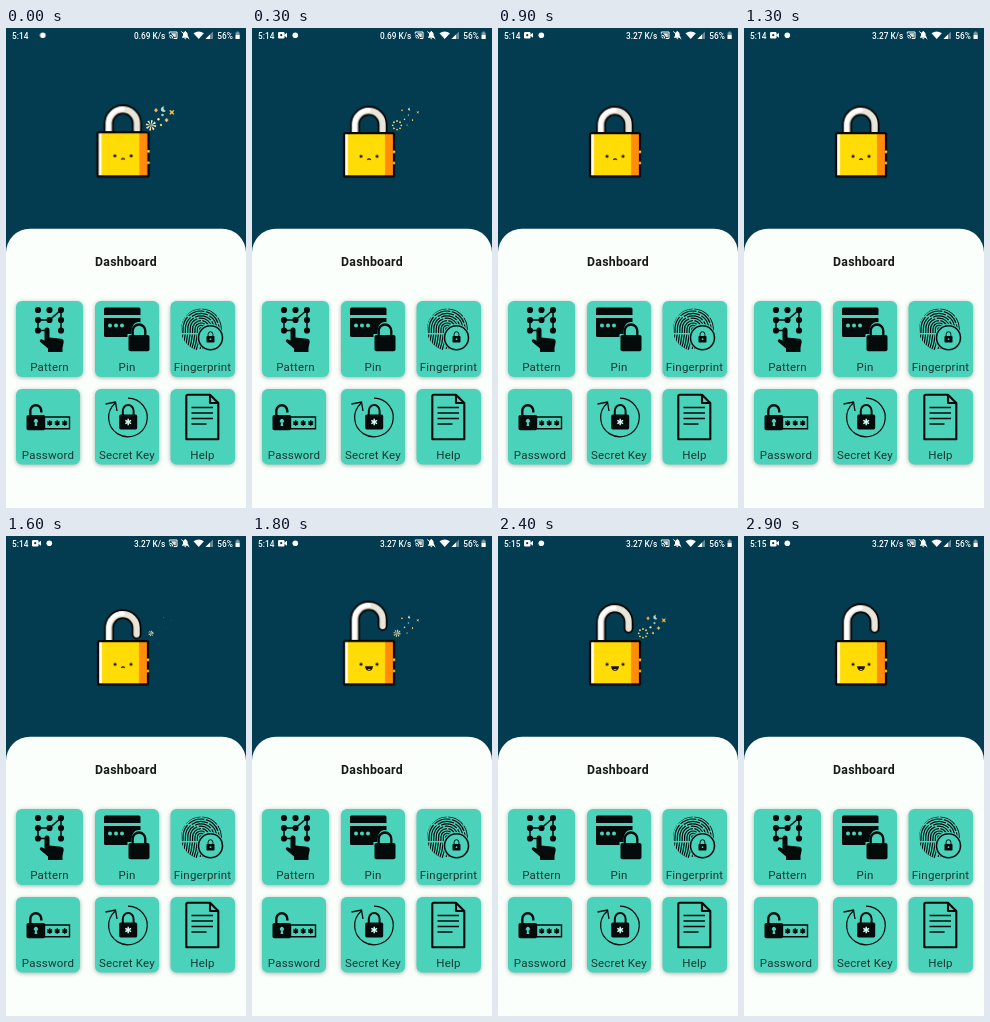
An HTML page that plays this animation: 240 by 480 pixels, repeating every 3000 ms.

```html
<!DOCTYPE html>
<html lang="en">
<head>
<meta charset="utf-8">
<title>Dashboard</title>
<style>
html, body { margin: 0; width: 100%; height: 100%; overflow: hidden; background: #033b50; }
svg { display: block; width: 100%; height: 100%; }
text { font-family: Roboto, "Open Sans", sans-serif; }
.status { fill: #fff; font-size: 8.3px; font-weight: 500; }
.title { font-size: 12.3px; font-weight: 700; letter-spacing: .25px; fill: #151918; text-anchor: middle; }
.labels { font-size: 11.5px; letter-spacing: .2px; fill: #173530; text-anchor: middle; }
.cards { fill: #4bd2ba; filter: drop-shadow(0 1.5px 2px rgba(0, 30, 25, .35)); }
.line { fill: none; stroke: #050a0a; }
.teal { fill: #4bd2ba; }

.clock-a, .clock-b, .rate-a, .rate-b, .cam, .badge, .calm, .happy { animation: 3s step-end infinite; }
.clock-a { animation-name: clock-a; }
.clock-b { animation-name: clock-b; }
.rate-a { animation-name: rate-a; }
.rate-b { animation-name: rate-b; }
.cam { animation-name: cam; }
.badge { animation-name: badge; }
.calm { animation-name: calm; }
.happy { animation-name: happy; }
@keyframes clock-a { 0% { opacity: 1 } 73.3%, 100% { opacity: 0 } }
@keyframes clock-b { 0% { opacity: 0 } 73.3%, 100% { opacity: 1 } }
@keyframes rate-a { 0% { opacity: 1 } 23.3%, 100% { opacity: 0 } }
@keyframes rate-b { 0% { opacity: 0 } 23.3%, 100% { opacity: 1 } }
@keyframes cam { 0% { opacity: 0 } 3.3%, 100% { opacity: 1 } }
@keyframes badge { 0% { transform: translateX(-6.5px) } 3.3%, 100% { transform: none } }
@keyframes calm { 0% { opacity: 1 } 60%, 100% { opacity: 0 } }
@keyframes happy { 0% { opacity: 0 } 60%, 100% { opacity: 1 } }

.shackle { animation: lift 3s linear infinite; }
@keyframes lift {
  0%, 50% { transform: none }
  53.3% { transform: translateY(-4.5px) }
  58.3% { transform: translateY(-14px) }
  66.7% { transform: translateY(-8px) }
  73%, 100% { transform: translateY(-10.5px) }
}
.lock { transform-origin: 117px 149px; animation: puff 3s linear infinite; }
@keyframes puff {
  0%, 70% { transform: scale(1.02) }
  8%, 58%, 78%, 100% { transform: none }
}
.bits > *, .bloom, .ring {
  transform-box: fill-box;
  transform-origin: center;
  animation: 3s linear infinite;
}
.bits > * { animation-name: bit; }
.bloom { animation-name: bloom; }
.ring { animation-name: ring; }
@keyframes bit {
  0%, 71.7% { transform: scale(1) }
  10% { transform: scale(.5) }
  17%, 50% { transform: scale(0) }
  53.3% { transform: scale(.12) }
  66.7% { transform: scale(.9) }
  80% { transform: scale(.8) }
  90%, 100% { transform: scale(0) }
}
@keyframes bloom {
  0%, 5% { transform: none; opacity: 1 }
  5.1%, 49.9% { transform: scale(0); opacity: 0 }
  50% { transform: scale(0); opacity: 1 }
  53.3% { transform: scale(.5); opacity: 1 }
  66.7% { transform: scale(.85); opacity: 1 }
  71.7%, 75% { transform: none; opacity: 1 }
  75.1%, 100% { transform: scale(0); opacity: 0 }
}
@keyframes ring {
  0%, 5% { opacity: 0 }
  5.1%, 10% { opacity: 1 }
  18%, 75% { opacity: 0 }
  75.1%, 81% { opacity: 1 }
  89%, 100% { opacity: 0 }
}
</style>
</head>
<body>
<svg viewBox="0 0 240 480" preserveAspectRatio="none">
  <defs>
    <g id="padlock">
      <rect y="10" width="20" height="15" rx="1.8"/>
      <path d="M4 11V6.5a6 6 0 0 1 12 0V11" fill="none" stroke="#050a0a" stroke-width="2.2"/>
    </g>
    <path id="star" d="M0-2.7V2.7M-2.4-1.4 2.4 1.4M-2.4 1.4 2.4-1.4"/>
    <path id="hoop" d="M103 124V96.5a13.8 13.8 0 0 1 27.6 0V103"/>
    <clipPath id="pad"><ellipse cx="195.5" cy="301.5" rx="20.5" ry="21"/></clipPath>
  </defs>

  <rect width="240" height="480" fill="#033b50"/>

  <g class="status">
    <text class="clock-a" x="6" y="10.5">5:14</text>
    <text class="clock-b" x="6" y="10.5">5:15</text>
    <g class="cam">
      <rect x="26" y="4" width="6.5" height="6.5" rx="1.2"/>
      <path d="M32 7 35 4.7V9.8L32 7.6z"/>
      <circle cx="29.2" cy="7.2" r="1.1" fill="#033b50"/>
    </g>
    <circle class="badge" cx="43.3" cy="7.3" r="2.8"/>
    <text class="rate-a" x="128" y="10.5">0.69 K/s</text>
    <text class="rate-b" x="128" y="10.5">3.27 K/s</text>
    <path d="M163.3 5.7V4h7.7v6.5h-3.2M163.3 7a3.5 3.5 0 0 1 3.5 3.5M163.3 8.8a1.7 1.7 0 0 1 1.7 1.7" fill="none" stroke="#fff"/>
    <path d="M165 5.3h4.8v3.9h-1.6z" opacity=".85"/>
    <path d="M176 9.8V9l1-.9V6q.2-1.8 1.6-2.2 0-.8.7-.8t.7.8q1.700.5 1.700 2.700v1.600l1 .9v.8zM178.300 10.200h2q-.2 1-1 1t-1-1z"/>
    <path d="M175.300 3.500l8 7.500" stroke="#fff"/>
    <path d="M187.500 5.300q5.200-3.800 10.400 0L192.700 11z"/>
    <path d="M199.500 11 207 3.500V11z" opacity=".4"/>
    <path d="M199.500 11l4.500-4.500V11z"/>
    <text x="211.300" y="10.500">56%</text>
    <path d="M229.600 4.400h1.100v-1h1.800v1h1.100v6.600h-4z" opacity=".5"/>
    <path d="M229.600 7h4v4h-4z"/>
  </g>

  <g class="lock">
    <g class="shackle" fill="none" stroke-linecap="round">
      <use href="#hoop" stroke="#080705" stroke-width="9.8"/>
      <use href="#hoop" stroke="#e8e5da" stroke-width="6.2"/>
      <path d="M102.300 124V96.500a14.500 14.500 0 0 1 14.500-14.500" stroke="#fff" stroke-width="4.200"/>
    </g>
    <rect x="92" y="105" width="50" height="43.500" rx="1.500" fill="#ffdc05"/>
    <path d="M133 105h9v43.500h-9z" fill="#ff8c0a"/>
    <path d="M92 105h4v43.500h-4z" fill="#fffbe8"/>
    <rect x="92" y="105" width="50" height="43.500" rx="1.500" fill="none" stroke="#080705" stroke-width="2.200"/>
    <path d="M142 122.500v2.500M142 134v2" stroke="#ffd45a" stroke-width="2.200"/>
    <g fill="#171005"><circle cx="109" cy="128.200" r="1.500"/><circle cx="125" cy="128.200" r="1.500"/></g>
    <path class="calm" d="M115.300 131.800q1.700-2 3.400 0" fill="none" stroke="#171005" stroke-width="1.300"/>
    <g class="happy">
      <path d="M113 130.300h8q-.5 4.500-4 4.500t-4-4.500z" fill="#171005"/>
      <path d="M115.300 133.500q1.700-1.300 3.400 0-1.700 1.200-3.400 0z" fill="#e8b89a"/>
    </g>
  </g>

  <g fill="none" stroke="#f7e7b0">
    <circle class="bloom" cx="145" cy="97.300" r="2.600" stroke-width="5.200" pathLength="16" stroke-dasharray="1 1"/>
    <circle class="ring" cx="145" cy="97.300" r="4.300" stroke="#f3d66a" stroke-width="1.800" pathLength="16" stroke-dasharray="0 2" stroke-linecap="round"/>
  </g>
  <g class="bits">
    <path d="M150 80l2 2.300-2 2.300-2-2.300z" fill="#f2b55e"/>
    <path d="M158.300 78.600a2.700 2.700 0 1 0 1.500 4.100 2.400 2.400 0 0 1-1.500-4.100z" fill="#c5dfcd"/>
    <path d="M164 82l1.800 1 1.800-1 .6.8-1.200 1.500 1.200 1.700-.7.7-1.700-1.200-1.800 1.200-.7-.7 1.200-1.700-1.200-1.500z" fill="#ffc044"/>
    <circle cx="156.500" cy="87" r="1.300" fill="#8fd3d6"/>
    <path d="M160.500 90l2 2-2 2.200-2-2.200z" fill="#f2c46a"/>
    <circle cx="152.500" cy="91.300" r="1.200" fill="#f5e6b4"/>
    <circle cx="155" cy="97" r="1.200" fill="#e9c85e"/>
  </g>

  <path d="M0 480V224.700a24 24 0 0 1 24-24H216a24 24 0 0 1 24 24V480z" fill="#fbfffb"/>
  <text class="title" x="120" y="237.700">Dashboard</text>

  <g class="cards">
    <rect x="10" y="273" width="67" height="76" rx="6"/>
    <rect x="89" y="273" width="64" height="76" rx="6"/>
    <rect x="164.500" y="273" width="64.500" height="76" rx="6"/>
    <rect x="10" y="361" width="64" height="75.500" rx="6"/>
    <rect x="89" y="361" width="64" height="75.500" rx="6"/>
    <rect x="164.500" y="361" width="64.500" height="75.500" rx="6"/>
  </g>
  <g class="labels">
    <text x="43.500" y="343">Pattern</text>
    <text x="121" y="343">Pin</text>
    <text x="196.500" y="343">Fingerprint</text>
    <text x="42" y="430.700">Password</text>
    <text x="121" y="430.700">Secret Key</text>
    <text x="196.500" y="430.700">Help</text>
  </g>

  <g fill="#050a0a">
    <!-- pattern -->
    <path class="line" d="M32 282h0M43.500 282h0M55 282h0M32 292h0M43.500 292h0M55 292h0M32 302.500h0M55 302.500h0" stroke-width="6.200" stroke-linecap="round"/>
    <path class="line" d="M41 302.500H32V292H43.500L55 282V302.500" stroke-width="1.500"/>
    <path d="M38.500 302q0-2.600 2.500-2.600t2.500 2.600v7.500l11.500 1.300q2.800.4 2.700 3.200l-1.200 6V324H42v-3.500l-7.700-6.500q-1.300-1.500.2-2.500t4 1.300z"/>

    <!-- pin -->
    <path d="M99.500 279.500h33.500q1.500 0 1.500 1.500V287H98V281q0-1.500 1.500-1.500zM98 290H134.500V309H99.500q-1.500 0-1.500-1.500z"/>
    <path d="M104 297.500h0M110 297.500h0M116 297.500h0" stroke="#4bd2ba" stroke-width="4" stroke-linecap="round"/>
    <path class="teal" d="M121.500 325V306h4q0-12 7.500-12t7.500 12h4V325z"/>
    <use href="#padlock" transform="translate(122.500 296) scale(1.050 1.090)"/>

    <!-- fingerprint, ridges added below -->
    <g id="ridges" class="line" stroke-width="1.200" stroke-dasharray="17 1.500" clip-path="url(#pad)"></g>
    <circle class="teal" cx="204.500" cy="309.700" r="13.600"/>
    <circle class="line" cx="204.500" cy="309.700" r="12" stroke-width="1.500"/>
    <use href="#padlock" transform="translate(200.500 303.500) scale(.4 .44)"/>
    <circle class="teal" cx="204.500" cy="311.200" r=".9"/>

    <!-- password -->
    <rect x="20.500" y="387" width="18.700" height="15.200" rx="1.800"/>
    <path class="line" d="M24.300 388v-5.200a5.500 5.500 0 0 1 11 0v1.700" stroke-width="2.400"/>
    <path class="teal" d="M28.500 398l.6-3.200a2 2 0 1 1 1.600 0l.6 3.200z"/>
    <path class="line" d="M39 389H63.500V400.800H39" stroke-width="1.400"/>
    <g class="line" stroke-width="1.500">
      <use href="#star" x="43.700" y="395"/>
      <use href="#star" x="51.200" y="395"/>
      <use href="#star" x="58.700" y="395"/>
    </g>

    <!-- secret key -->
    <path class="line" d="M122 370.200A19.300 19.300 0 1 1 109 375.200" stroke-width="1.200"/>
    <path class="line" d="M99.500 376 109.500 374 111 383" stroke-width="1.300"/>
    <use href="#padlock" transform="translate(113.200 376.500) scale(.9 1)"/>
    <use href="#star" transform="translate(122.200 394) scale(1.200)" stroke="#d8fff5" stroke-width="1.200"/>

    <!-- help -->
    <path class="line" d="M181.800 366.700H204L212.300 375V411.300H180.300V368.200q0-1.500 1.500-1.500zM204 367V375H212" stroke-width="2.100" stroke-linejoin="round"/>
    <path class="line" d="M185.500 379.500h21.500M185.500 385h21.500M185.500 390.500h21.500M185.500 396h15" stroke-width="1.500"/>
  </g>
</svg>
<script>
// Nested arches whose left ends sweep down and outwards.
let ridges = "";
for (let r = 1.2; r < 21; r += 2.4) {
  ridges += `<path d="M${191 - r} 323q4-10 4-22a${r} ${r} 0 0 1 ${2 * r} 0q0 10-2 20"/>`;
}
document.getElementById("ridges").innerHTML = ridges;
</script>
</body>
</html>
```
